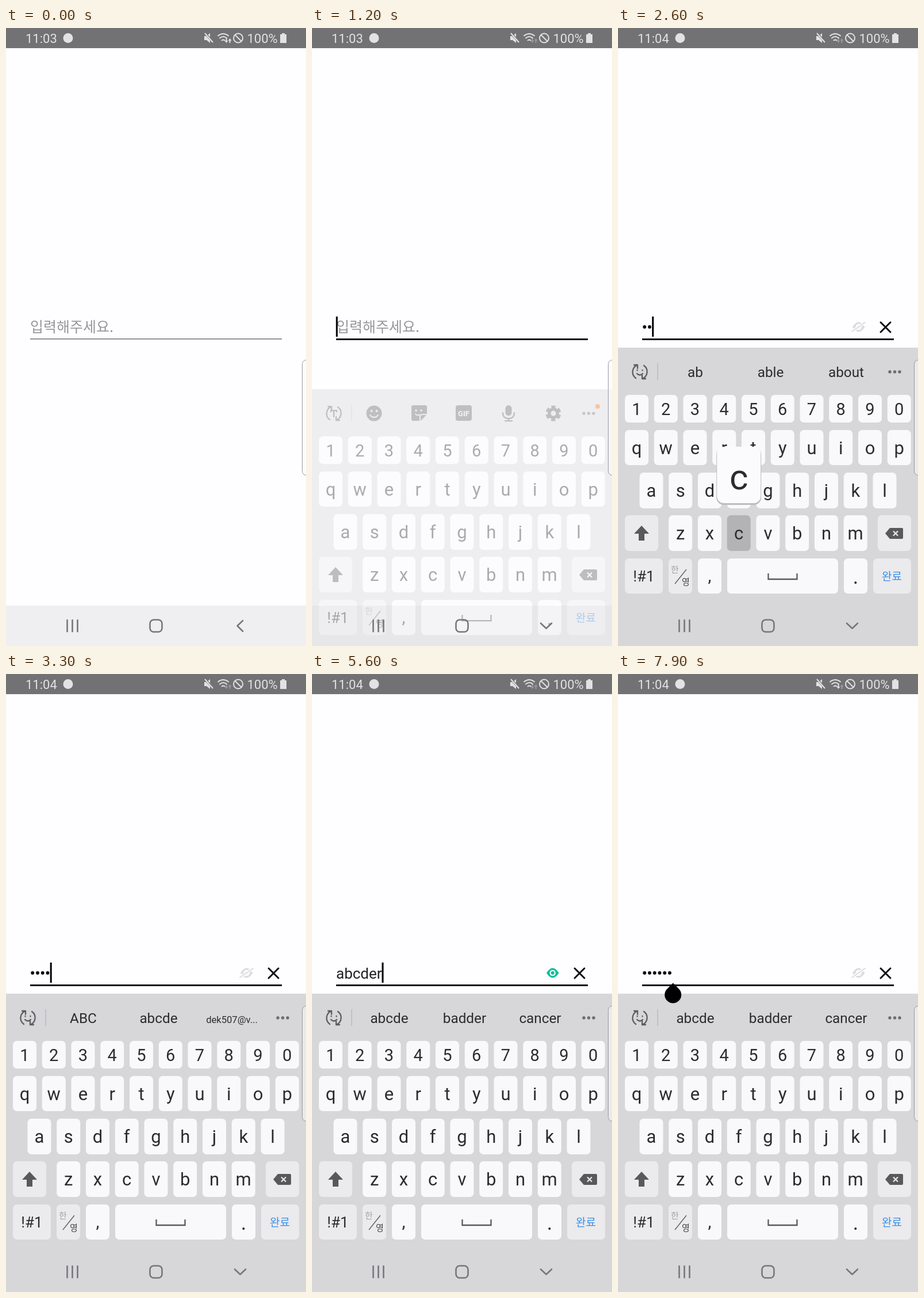
Animation of 522x1073 px, one loop 8000 ms. Source, as an HTML page:

```html
<!DOCTYPE html>
<html lang="ko">
<head>
<meta charset="utf-8">
<style>
html, body { margin: 0; width: 100%; height: 100%; overflow: hidden; background: #fefdff; }
svg { display: block; width: 522px; height: 1073px; font-family: Roboto, "Noto Sans CJK KR", "Noto Sans CJK", sans-serif; }
.ko { font-family: "Noto Sans CJK KR", "Noto Sans CJK", sans-serif; }
.mid { text-anchor: middle; }
.line { fill: none; stroke-linecap: round; stroke-linejoin: round; }
</style>
</head>
<body>
<svg viewBox="0 0 522 1073">
  <rect width="522" height="1073" fill="#fefdff"/>

  <text id="hint" class="ko" x="42" y="528" font-size="25" fill="#969598">입력해주세요.</text>
  <text id="plain" x="42" y="529" font-size="26" fill="#222"></text>
  <g id="dots" fill="#111"></g>
  <rect id="rule" x="42" width="438"/>
  <rect id="caret" y="501" width="3" height="35"/>
  <g id="tools">
    <path d="M457 511l17 17m0-17l-17 17" stroke="#111" stroke-width="3" class="line"/>
    <g id="eye">
      <path d="M408 519Q418.500 502 429.500 519Q418.500 536 408 519Z"/>
      <circle cx="418.700" cy="519" r="5.200" fill="#fefdff"/>
      <circle cx="418.700" cy="519" r="3"/>
    </g>
    <path id="slash" d="M407 527l23-16" stroke="#fefdff" stroke-width="5"/>
    <path id="slash2" d="M407 527l23-16" stroke="#dcdbde" stroke-width="2" class="line"/>
  </g>

  <g id="kb">
    <rect y="555" width="522" height="718" fill="#d7d6d9"/>
    <g class="line" stroke="#5d5d60" stroke-width="2.300">
      <path id="arrow" d="M28 585h6v6M33 585.500A13 13 0 0 0 31 608"/>
      <use href="#arrow" transform="rotate(180 38 597)"/>
      <path id="tee" d="M33 594v-2h10v2M38 592v11"/>
      <path id="smile" d="M33 600q5 5 10 0M33.500 594v.5M42.500 594v.5"/>
    </g>
    <path d="M69 582v29" stroke="#bab9bc" stroke-width="1.500"/>
    <g id="icons" fill="#5d5d60">
      <circle cx="108" cy="597" r="13.500"/>
      <path d="M176 583h21q3 0 3 3v13l-11 11h-13q-3 0-3-3v-21q0-3 3-3z"/>
      <path d="M188 611v-8q0-4 4-4h9" fill="none" stroke="#d7d6d9" stroke-width="2"/>
      <rect x="250" y="583" width="28" height="27" rx="4"/>
      <text x="264" y="602" font-size="13" font-weight="700" fill="#e5e4e7" class="mid">GIF</text>
      <rect x="336.500" y="583" width="11" height="18" rx="5.500"/>
      <path d="M332 596q0 10 10 10t10-10M342 606v4M336 610h12" class="line" stroke="#5d5d60" stroke-width="2.300"/>
      <circle cx="420" cy="597" r="10"/>
      <circle cx="420" cy="597" r="11" fill="none" stroke="#5d5d60" stroke-width="5" stroke-dasharray="6.900 4.620" transform="rotate(-108 420 597)"/>
      <circle cx="420" cy="597" r="4.500" fill="#d7d6d9"/>
      <g fill="#d7d6d9">
        <circle cx="103.500" cy="593" r="2"/><circle cx="112.500" cy="593" r="2"/>
        <circle cx="181" cy="592" r="1.800"/><circle cx="190" cy="592" r="1.800"/>
      </g>
      <path d="M101 600q7 8 14 0M180 598q4 4 7 1" class="line" stroke="#d7d6d9" stroke-width="2"/>
      <circle cx="497" cy="585" r="4" fill="#fa6a0a"/>
    </g>
    <g fill="#6d6d70"><circle cx="473" cy="597" r="2.700"/><circle cx="481.500" cy="597" r="2.700"/><circle cx="490" cy="597" r="2.700"/></g>
    <g id="words" class="mid" fill="#2c2c2e"><text x="134.500" y="606"></text><text x="265.500" y="606"></text><text x="397" y="606"></text></g>
    <g id="keys"></g>
    <path d="M41 864l13 14h-8v12h-10v-12h-8z" fill="#59595c"/>
    <path d="M465 877.500l8-9.500h21q2 0 2 2v15q0 2-2 2h-21z" fill="#59595c"/>
    <path d="M479 873.500l8 8m0-8l-8 8" stroke="#ebeaed" stroke-width="2.200"/>
    <path d="M261.500 947v10h50v-10" fill="none" stroke="#59595c" stroke-width="2.300"/>
    <path d="M99 965l20-25" stroke="#59595c" stroke-width="1.300"/>
    <g class="ko mid">
      <text x="99" y="946" font-size="15" fill="#a3a2a5">한</text>
      <text x="118" y="967" font-size="15" fill="#444">영</text>
      <text x="476.500" y="959" font-size="19" fill="#3b90e8">완료</text>
    </g>
  </g>

  <g id="popup">
    <rect x="-39" y="-118" width="78" height="100" rx="13" fill="#bcbbbe"/>
    <rect x="-38" y="-119" width="76" height="98" rx="12" fill="#fbfafd"/>
    <text y="-45" font-size="62" fill="#2c2c2e" class="mid"></text>
  </g>

  <rect id="shade" y="1003" width="522" height="70"/>
  <g class="line" stroke="#777679" stroke-width="2.600">
    <path d="M106.500 1028v20M115.500 1028v20M124.500 1028v20"/>
    <rect x="250.500" y="1027.500" width="21" height="21" rx="6.500"/>
    <path id="back"/>
  </g>
  <rect x="515.500" y="576.500" width="20" height="200" rx="7" fill="#fefdff" fill-opacity=".5" stroke="#98979a"/>

  <rect width="522" height="35" fill="#727174"/>
  <g fill="#e2e1e4" font-size="22">
    <text id="clock" x="34" y="26"></text>
    <text x="419.500" y="26">100%</text>
    <circle cx="108" cy="17.500" r="8.500"/>
    <path d="M345 14h4l6-5v17l-6-5h-4z"/>
    <path d="M346 9l15 16" stroke="#727174" stroke-width="4"/>
    <path d="M346 9l14 16" stroke="#e2e1e4" stroke-width="2"/>
    <g class="line" stroke="#e2e1e4" stroke-width="2">
      <path d="M369 13.500q9-7 18 0M372 17.500q6-5 12 0M375.500 21.500q2.500-2 5 0"/>
      <circle cx="404" cy="17.500" r="8"/><path d="M398.500 12l11 11"/>
    </g>
    <path id="down" d="M382.500 18h2v4h2l-3 4-3-4h2z"/>
    <path id="up" d="M388.500 26h2v-4h2l-3-4-3 4h2z"/>
    <path d="M480 9h5v2h3v15h-11v-15h3z"/>
  </g>
  <path id="handle" d="M0 536.500l10.250 10.250A14.500 14.500 0 1 1-10.250 546.750Z"/>
</svg>
<script>
const $ = id => document.getElementById(id);
const show = (id, on) => $(id).style.display = on ? '' : 'none';
const within = (t, spans) => spans.some(([a, b]) => t >= a && t < b);
const pitch = 50.75, light = '#f9f8fb', dim = '#ebeaed';
const keyPos = {};
let markup = '';

function addKey(x, y, w, h, label = '', size = 31, fill = light, base = y + 42) {
  markup += `<rect x="${x}" y="${y}" width="${w}" height="${h}" rx="7" fill="${fill}" data-key="${label}"/>
    <text x="${x + w / 2}" y="${base}" font-size="${size}" fill="#2c2c2e" class="mid">${label}</text>`;
  keyPos[label] = [x + w / 2, y];
}
function addRow(labels, x, y, h, size, base) {
  [...labels].forEach((c, i) => addKey(x + i * pitch, y, 41, h, c, size, light, base));
}
addRow('1234567890', 12, 637, 48, 29, 672);
addRow('qwertyuiop', 12, 698, 61);
addRow('asdfghjkl', 37.5, 772, 62);
addRow('zxcvbnm', 88.200, 846, 62);
addKey(12, 846, 58, 62, '', 0, dim);
addKey(452, 846, 58, 62, '', 0, dim);
addKey(12, 921, 66, 61, '!#1', 26, dim, 961);
addKey(88, 921, 41, 61, '', 0, dim);
addKey(139, 921, 41, 61, ',', 30, light, 961);
addKey(190, 921, 193, 61);
addKey(393, 921, 41, 61, '.', 36, light, 965);
addKey(444, 921, 66, 61, '', 0, dim);
$('keys').innerHTML = markup;
$('dots').innerHTML = [...'abcder'].map((c, i) => `<circle cx="${46.2 + i * 8.75}" cy="519" r="3"/>`).join('');

const presses = [[1900, 'a'], [2300, 'b'], [2600, 'c'], [3000, 'd'], [3500, 'e'], [3900, 'r']];
const suggestions = [
  [2200, 'a', 'and', 'at'], [2500, 'ab', 'able', 'about'], [2900, 'abc', 'ABC', "ABC's"],
  [3200, 'ABC', 'abcde', 'dek507@v...'], [3800, "ABC's", 'abide', 'above'], [4300, 'abcde', 'badder', 'cancer']
];

function draw(t) {
  const focused = t >= 900;
  const typed = presses.filter(p => t >= p[0] + 100).map(p => p[1]).join('');
  const n = typed.length;
  const revealed = t >= 5200 && t < 7100;
  const endX = revealed ? 123 : 43.2 + n * 8.75;

  // input field
  show('hint', !n);
  $('plain').textContent = revealed ? typed : '';
  [...$('dots').children].forEach((d, i) => d.style.display = !revealed && i < n ? '' : 'none');
  $('rule').setAttribute('y', 539);
  $('rule').setAttribute('height', focused ? 3 : 1.7);
  $('rule').setAttribute('fill', focused ? '#111' : '#7d8285');
  $('caret').setAttribute('x', endX - 1.5);
  show('caret', focused && !within(t, [[1400, 1900], [4600, 5100], [6300, 6800], [7600, 8000]]));
  show('tools', n);
  $('eye').setAttribute('fill', revealed ? '#0abf96' : '#dcdbde');
  show('slash', !revealed);
  show('slash2', !revealed);
  show('handle', t >= 5900);
  $('handle').setAttribute('transform', `translate(${endX})`);

  // keyboard slides up while fading in
  const p = Math.min(1, Math.max(0, (t - 1000) / 400));
  $('kb').setAttribute('opacity', p ** 1.37);
  $('kb').setAttribute('transform', `translate(0 ${204 * (1 - p) ** 1.5})`);
  $('shade').setAttribute('opacity', .06 * (1 - p));
  $('back').setAttribute('d', t < 1000 ? 'M412 1029l-9.500 9 9.500 9.500' : 'M398 1033.500l9.500 9 9.500-9');

  const words = suggestions.filter(s => t >= s[0]).pop();
  show('icons', !words);
  show('tee', !words);
  show('smile', words);
  [...$('words').children].forEach((el, i) => {
    const word = words ? words[i + 1] : '';
    el.textContent = word;
    el.setAttribute('font-size', word.length > 8 ? 16.6 : 24.3);
    el.setAttribute('x', word.length > 8 ? 393 : [134.5, 265.5, 397][i]);
  });

  const press = presses.find(k => t >= k[0] && t < k[0] + 100);
  show('popup', press);
  for (const [, c] of presses)
    document.querySelector(`[data-key="${c}"]`).setAttribute('fill', press && press[1] === c ? '#b3b2b5' : light);
  if (press) {
    $('popup').setAttribute('transform', `translate(${keyPos[press[1]]})`);
    $('popup').lastElementChild.textContent = press[1];
  }

  // status bar
  $('clock').textContent = t < 1400 ? '11:03' : '11:04';
  $('down').setAttribute('opacity', within(t, [[0, 600], [1600, 2600], [4600, 5600], [6700, 8000]]) ? 1 : .35);
  $('up').setAttribute('opacity', t < 600 ? 1 : .35);
}

const start = performance.now();
function tick() {
  const t = (performance.now() - start) % 8000;
  draw(Math.floor(t / 100) * 100);
  requestAnimationFrame(tick);
}
tick();
</script>
</body>
</html>
```
